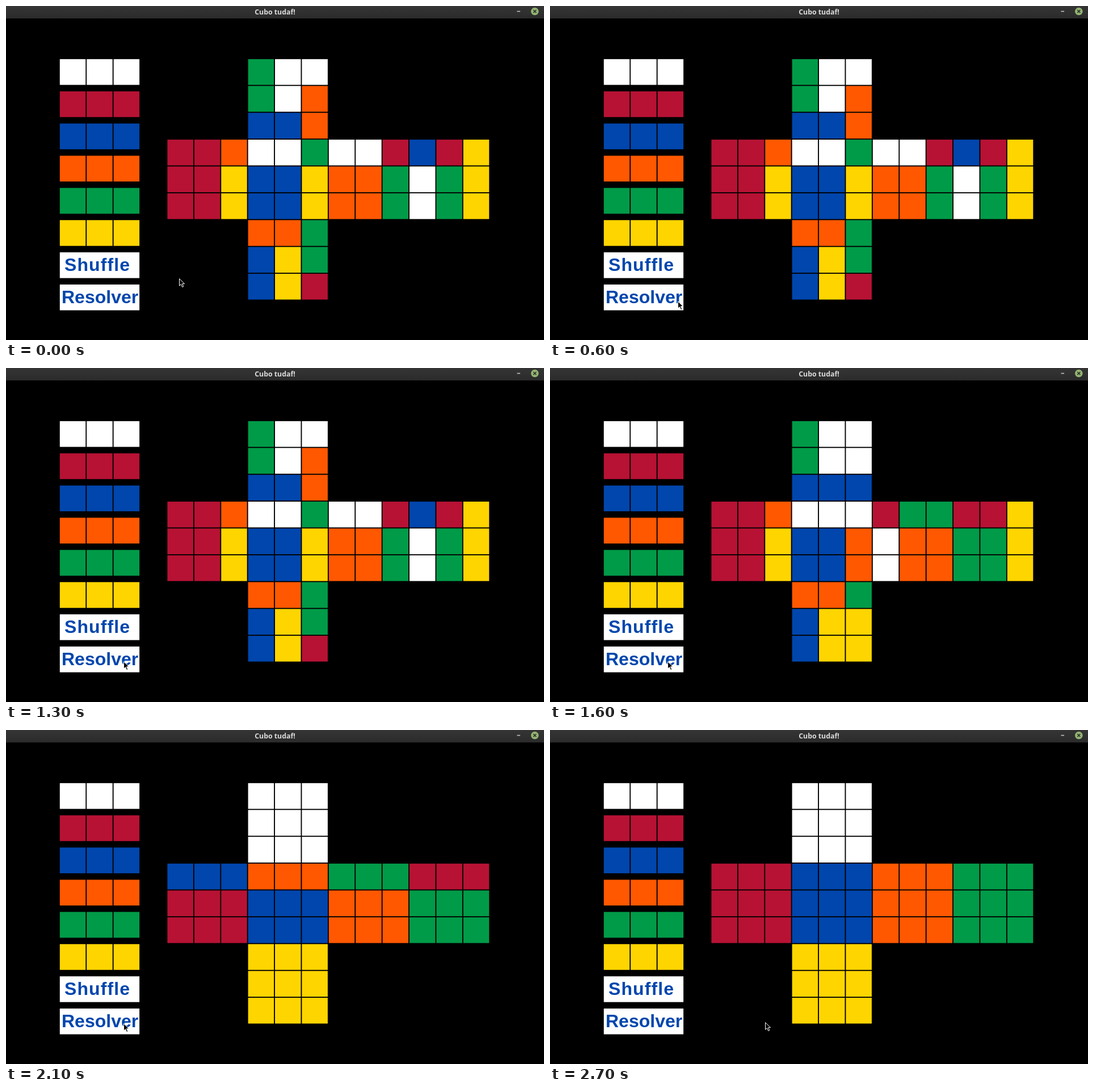
Animation of 948 by 590 pixels, one loop 2.8 s. Source, as an HTML page:

```html
<!DOCTYPE html>
<html lang="es">
<head>
<meta charset="utf-8">
<title>Cubo</title>
<style>
  html, body { margin: 0; width: 100%; height: 100%; overflow: hidden; background: #000; }
  svg { display: block; }
  .title { font: 600 12.3px "Noto Sans", "Open Sans", sans-serif; fill: #dcdcdc; text-anchor: middle; }
  .label { font: bold 32px "Liberation Sans", Arial, sans-serif; fill: #0046ad; }
  .loose { letter-spacing: 1.1px; }
</style>
</head>
<body>
<svg width="948" height="590" viewBox="0 0 948 590">
  <defs>
    <linearGradient id="bar" x2="0" y2="1">
      <stop offset="0" stop-color="#353535"/>
      <stop offset="1" stop-color="#2b2b2b"/>
    </linearGradient>
  </defs>
  <rect width="948" height="590"/>
  <rect width="948" height="22" fill="url(#bar)"/>
  <text class="title" x="474" y="15">Cubo tudaf!</text>
  <path d="M900.5 9.5h5.5" stroke="#c4c4c4" stroke-width="1.6"/>
  <circle cx="931.8" cy="9.5" r="6.8" fill="#92b372"/>
  <path d="M929.3 7l5 5m0-5l-5 5" stroke="#2b2b2b" stroke-width="1.7"/>
  <g id="cells" transform="scale(.948)"></g>
  <text class="label loose" x="103" y="468">Shuffle</text>
  <text class="label" x="98" y="525">Resolver</text>
  <path id="cursor" d="M.5.7V13.2l2.9-2.7 2.3 5 2.1-1-2.3-4.8h4Z" stroke="#fff" stroke-linejoin="round"/>
</svg>
<script>
const LOOP = 2800;
const COLORS = { W: '#fff', R: '#b71234', B: '#0046ad', O: '#ff5800', G: '#009b48', Y: '#ffd500' };

// Net rows from top to bottom: upper face, belt of four faces, lower face
const STATES = [
  [0, 'GWW GWO BBO RROWWGWWRBRY RRYBBYOOGWGY RRYBBYOOGWGY OOG BYG BYR'],
  [1600, 'GWW GWW BBB RROWWWRGGRRY RRYBBOWOOGGY RRYBBOWOOGGY OOG BYY BYY'],
  [1800, 'GWW GWW RWW RRBWOOGGGRRY RRBWBBOOOGGY RRBWBBOOOGGY OYY BYY BYY'],
  [2100, 'WWW WWW WWW BBBOOOGGGRRR RRRBBBOOOGGG RRRBBBOOOGGG YYY YYY YYY'],
  [2300, 'WWW WWW WWW RRRBBBOOOGGG RRRBBBOOOGGG RRRBBBOOOGGG YYY YYY YYY']
];

// Pointer stops: time, x, y
const STOPS = [
  [0, 305, 481], [100, 292, 490], [200, 281, 499], [600, 225, 521],
  [800, 218, 525], [900, 213, 526], [1100, 211, 523], [1200, 208, 520],
  [1300, 207, 518], [2200, 213, 518], [2300, 258, 516], [2400, 324, 515],
  [2500, 368, 517], [2600, 381, 518], [2700, 379, 516]
];

const group = document.getElementById('cells');
const cursor = document.getElementById('cursor');

function addRect(x, y, width, fill) {
  const rect = document.createElementNS('http://www.w3.org/2000/svg', 'rect');
  const attrs = { x, y, width, height: 48, fill };
  for (const name in attrs) rect.setAttribute(name, attrs[name]);
  group.append(rect);
  return rect;
}

[...'WRBOGY'].forEach((key, row) => {
  for (let i = 0; i < 3; i++) addRect(100 + 50 * i, 99 + 60 * row, 48, COLORS[key]);
});
addRect(100, 459, 148, '#fff');
addRect(100, 519, 148, '#fff');

const stickers = STATES[0][1].split(' ').flatMap((row, j) =>
  [...row].map((key, i) =>
    addRect((row.length === 3 ? 450 : 300) + 50 * i, 99 + 50 * j, 48, COLORS[key])));

const latest = (list, t) => list.findLast(item => item[0] <= t);

let shown;
function draw(now) {
  const t = Math.max(0, now) % LOOP;
  const [, x, y] = latest(STOPS, t);
  cursor.setAttribute('transform', `translate(${x} ${y})`);
  const state = latest(STATES, t)[1];
  if (state !== shown) {
    [...state.replaceAll(' ', '')].forEach((key, i) => stickers[i].setAttribute('fill', COLORS[key]));
    shown = state;
  }
}

const start = performance.now();
function tick() {
  draw(performance.now() - start);
  requestAnimationFrame(tick);
}
tick();
</script>
</body>
</html>
```
